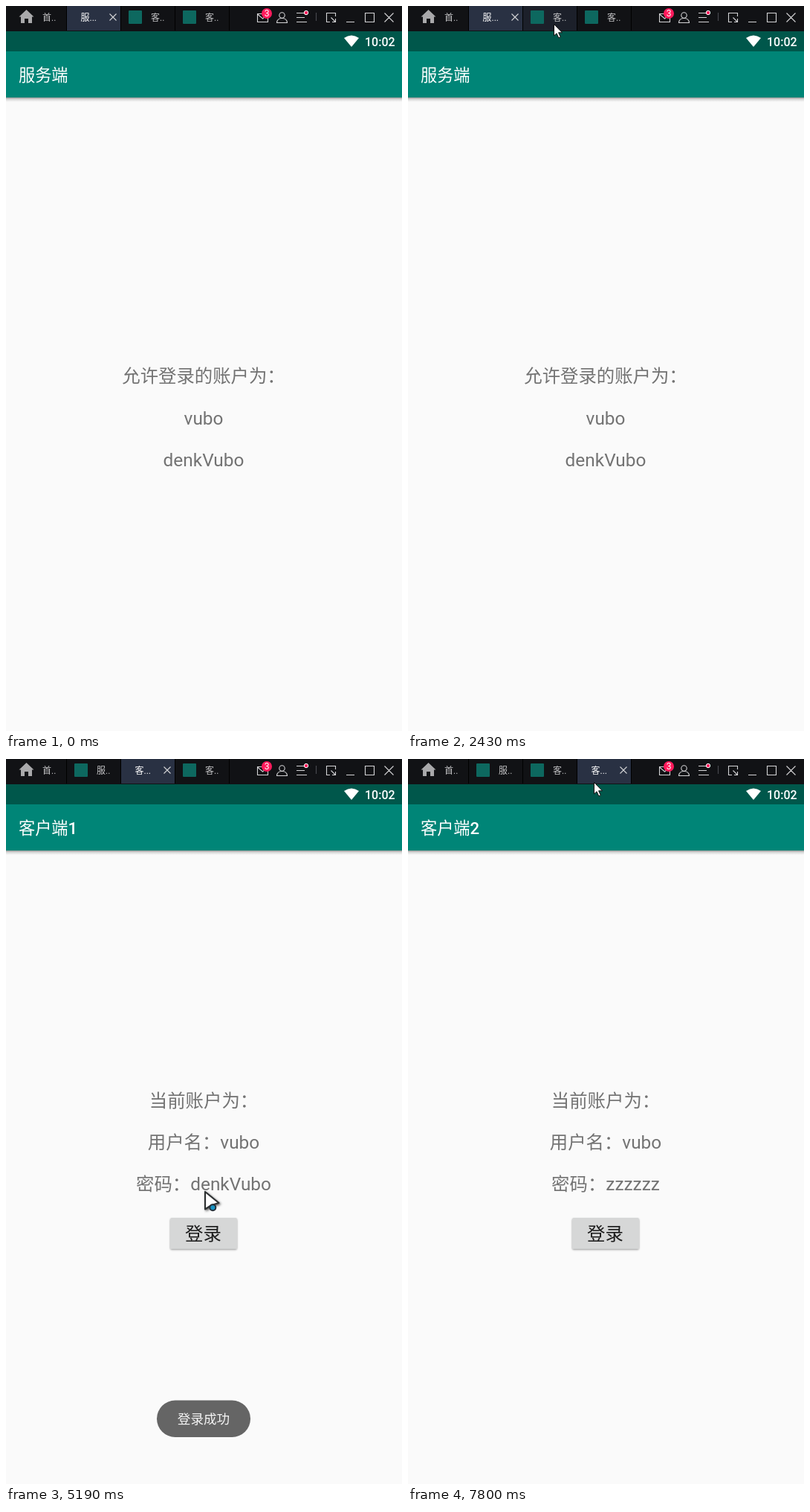
Animation of 533x975 px, one loop 8 s. Source, as an HTML page:

```html
<!DOCTYPE html>
<html lang="zh-CN">
<head>
<meta charset="utf-8">
<title>登录演示</title>
<style>
html, body { margin: 0; width: 100%; height: 100%; overflow: hidden; background: #fafafa; }
svg { display: block; width: 100vw; height: 100vh; }
text { font-family: Roboto, "Noto Sans CJK SC", "Noto Sans CJK", sans-serif; }
.tab text { font-size: 12px; fill: #c4c4c6; }
.tab.on text { fill: #fff; }
.body { font-size: 24.4px; fill: #737373; text-anchor: middle; }
.line { fill: none; stroke: #d4d4d6; stroke-width: 1.1; }
</style>
</head>
<body>
<svg id="stage" viewBox="0 0 533 975" preserveAspectRatio="none">
  <defs>
    <linearGradient id="under" x2="0" y2="1">
      <stop offset="0" stop-color="#000" stop-opacity=".4"/>
      <stop offset=".4" stop-color="#000" stop-opacity=".14"/>
      <stop offset="1" stop-color="#000" stop-opacity="0"/>
    </linearGradient>
    <filter id="soft" x="-40%" y="-40%" width="190%" height="190%">
      <feDropShadow dx="1.5" dy="1.5" stdDeviation="1.8" flood-color="#000" flood-opacity=".6"/>
    </filter>
    <filter id="lift" x="-10%" y="-20%" width="120%" height="150%">
      <feDropShadow dx="0" dy="1.4" stdDeviation="1" flood-color="#000" flood-opacity=".4"/>
    </filter>
  </defs>

  <rect width="533" height="975" fill="#fafafa"/>
  <rect y="123" width="533" height="6" fill="url(#under)"/>
  <rect y="61" width="533" height="62" fill="#008577"/>
  <rect y="34" width="533" height="27" fill="#00574b"/>
  <path d="M455 43Q465 36 475 43L465 55Z" fill="#fff"/>
  <text x="483" y="54" font-size="16" font-weight="500" fill="#fff">10:02</text>
  <text x="17" y="100.500" font-size="22.2" fill="#fff"><tspan id="title"></tspan><tspan id="number" font-weight="500"></tspan></text>

  <g id="server" class="body">
    <text x="266" y="506">允许登录的账户为：</text>
    <text x="266" y="563">vubo</text>
    <text x="266" y="619">denkVubo</text>
  </g>
  <g id="client" class="body">
    <text x="266" y="468">当前账户为：</text>
    <text x="266" y="524">用户名：vubo</text>
    <text x="266" y="580" id="secret"></text>
    <rect x="221" y="617" width="90" height="41.5" rx="2" fill="#d6d7d7" filter="url(#lift)"/>
    <text x="265.5" y="647" fill="#1c1c1c">登录</text>
  </g>
  <g id="toast">
    <rect x="203" y="862.5" width="126" height="49.5" rx="24.7" fill="#656565"/>
    <text x="266" y="894" font-size="17.6" fill="#f4f4f4" text-anchor="middle">登录成功</text>
  </g>

  <rect width="533" height="34" fill="#111215"/>
  <g class="tab">
    <path d="M27.500 5L37.500 14.500H35V23H30V17H25V23H20V14.500H17.500Z" fill="#a9a9ab"/>
    <text x="49" y="19.500">首..</text>
  </g>
  <g id="tabs"></g>
  <g class="line">
    <path d="M338.500 10.500H352.500V21.500H338.500ZM338.500 11L345.500 17L352.500 11"/>
    <circle cx="371.500" cy="12.500" r="3.700"/>
    <path d="M364.500 22.500Q365 16.500 371.500 16.500T378.500 22.500Z"/>
    <path d="M391 9.500H401M391 15.500H402M391 21.500H405"/>
    <path d="M417.500 9V20" stroke="#4a4b50"/>
    <path d="M436 21.500H431.500V9.500H443.500V14M437.500 15.500L443.500 21.500M443.500 17V21.500H439"/>
    <path d="M458 21.500H469M483.500 9.500H495.500V21.500H483.500ZM509.500 9.500L521.500 21.500M521.500 9.500L509.500 21.500"/>
  </g>
  <circle cx="351" cy="10" r="7" fill="#ff1a5c"/>
  <text x="351" y="14.300" font-size="12" fill="#fff" text-anchor="middle">3</text>
  <circle cx="404" cy="9" r="2.700" fill="#ff1a5c" stroke="#fff"/>

  <g id="cursor">
    <g id="large">
      <path d="M0 0V23.500L8.500 18L18.500 15Z" fill="#fff" stroke="#2d3033" stroke-width="2.200" stroke-linejoin="round" filter="url(#soft)"/>
      <circle cx="10.300" cy="21.300" r="4" fill="#1593c4" stroke="#26313a" stroke-width="2"/>
    </g>
    <path id="small" d="M.5 .5V16L4 12.800L6.800 18.800L9.300 17.700L6.600 11.800H11.500Z" fill="#fff" stroke="#111" stroke-width="1"/>
  </g>
</svg>
<script>
const LOOP = 8000, STEP = 30, APPEAR = 90, BAR = 34;
const $ = id => document.getElementById(id);
const clamp = u => Math.min(1, Math.max(0, u));
const ease = u => u * u * (3 - 2 * u);

// The pointer's route is a chain of legs, each starting where the last one ended.
const legs = [];
let clock = APPEAR, spot = [490, 92];

function leg(until, place) {
  legs.push({ from: clock, until, place });
  clock = until;
  spot = place(1);
}
function move(until, x, y) {
  const [x0, y0] = spot;
  leg(until, u => [x0 + (x - x0) * ease(u), y0 + (y - y0) * ease(u)]);
}
function rest(until) {
  move(until, ...spot);
}
// Circles clockwise round a centre; flat is the ellipse's height over its width.
function circle(until, cx, cy, flat, turns) {
  const dx = spot[0] - cx, dy = (spot[1] - cy) / flat;
  const r = Math.hypot(dx, dy), a0 = Math.atan2(dy, dx);
  leg(until, u => {
    const a = a0 + u * turns * 2 * Math.PI;
    return [cx + r * Math.cos(a), cy + flat * r * Math.sin(a)];
  });
}

// Server page: title, then the accounts
move(300, 140, 150);
circle(780, 78, 152, 0.35, 2);
move(870, 282, 168);
move(960, 289, 590);
move(1080, 388, 600);
circle(1590, 238, 605, 0.7, 0.9);
move(1680, 452, 361);
rest(2070);
move(2430, 196, 24);
rest(2520);
move(2640, 190, 15);
// First client: title, account, button, toast
rest(2850);
move(2970, 214, 46);
rest(3090);
move(3240, 136, 118);
circle(3560, 78, 125, 0.4, 1);
move(3960, 281, 536);
move(4080, 386, 620);
circle(4500, 272, 605, 1.05, 0.75);
move(4620, 265, 632);
rest(4800);
move(5190, 268, 582);
move(5580, 300, 566);
move(5760, 450, 905);
circle(6120, 298, 915, 0.3, 0.95);
// Second client
move(6420, 204, 57);
move(6690, 250, 29);
rest(7530);
move(7800, 250, 31);

function pointer(t) {
  const now = legs.find(l => t < l.until) || legs[legs.length - 1];
  return now.place(clamp((t - now.from) / (now.until - now.from)));
}

const show = (el, on) => el.style.display = on ? "" : "none";

const tabs = ["服", "客", "客"].map((name, i) => {
  const left = 82 + 73 * i;
  $("tabs").insertAdjacentHTML("beforeend", `<g transform="translate(${left})">
    <rect width="73" height="33"/>
    <path d="M-.5 0V33M72.500 0V33" stroke="#000"/>
    <rect class="icon" x="10" y="6" width="18" height="18" rx="1" fill="#0d685f"/>
    <path class="line close" d="M57.500 10.500L66.500 19.500M66.500 10.500L57.500 19.500"/>
    <text y="19.500"></text></g>`);
  const el = $("tabs").lastElementChild;
  const [back, icon, close, label] = ["rect", ".icon", ".close", "text"].map(s => el.querySelector(s));
  return (on, x, y) => {
    const hover = y < BAR && x >= left && x < left + 73;
    el.setAttribute("class", on ? "tab on" : "tab");
    back.setAttribute("fill", on ? "#293143" : hover ? "#1c202a" : "#111215");
    show(icon, !on);
    show(close, on);
    label.setAttribute("x", on ? 18.5 : 40);
    label.textContent = name + (on ? "..." : "..");
  };
});

function draw(time) {
  const t = Math.floor(time / STEP) * STEP;
  const page = t < 2640 ? 0 : t < 6900 ? 1 : 2;
  const [x, y] = pointer(t);

  tabs.forEach((paint, i) => paint(i === page, x, y));
  $("title").textContent = page ? "客户端" : "服务端";
  $("number").textContent = page || "";
  $("secret").textContent = page === 2 ? "密码：zzzzzz" : "密码：denkVubo";
  show($("server"), page === 0);
  show($("client"), page > 0);
  show($("toast"), page === 1);
  $("toast").style.opacity = clamp((t - 4800) / 330);

  show($("cursor"), t >= APPEAR);
  show($("large"), y >= BAR);
  show($("small"), y < BAR);
  $("cursor").setAttribute("transform", `translate(${Math.round(x)} ${Math.round(y)})`);
}

const start = performance.now();
function tick(now) {
  draw(Math.max(0, now - start) % LOOP);
  requestAnimationFrame(tick);
}
draw(0);
requestAnimationFrame(tick);
</script>
</body>
</html>
```
